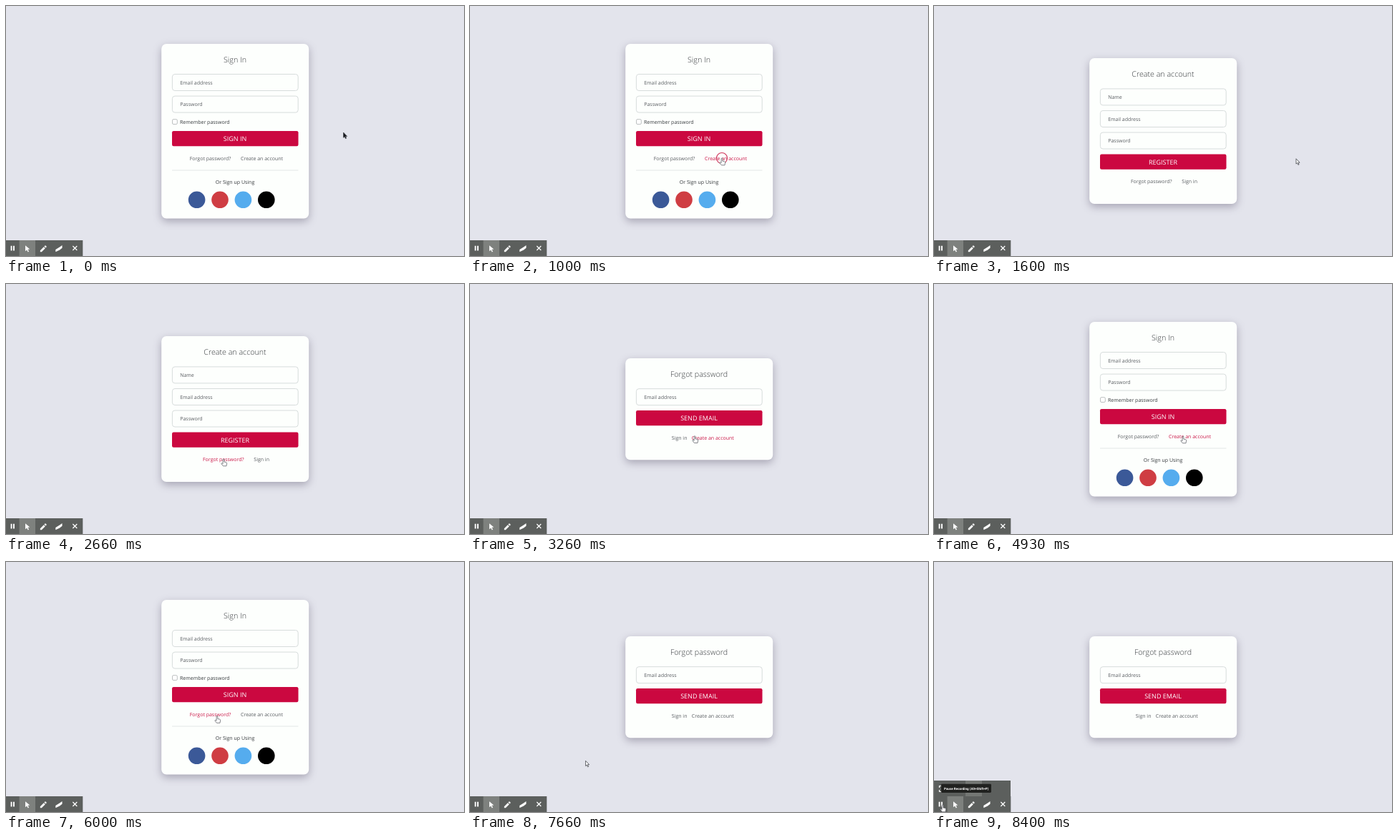
Recreate the animation shown at these times as an HTML page. Size 640 px wide and 350 px high, loop 8.46 s.

```html
<!DOCTYPE html>
<html lang="en">
<head>
<meta charset="utf-8">
<title>Sign in card</title>
<style>
  html, body { margin: 0; width: 100%; height: 100%; overflow: hidden; background: #e3e4ec; }
  svg { display: block; width: 640px; height: 350px; }
  text { font-family: "Open Sans", "Noto Sans", sans-serif; font-size: 7px; fill: #5a5d62; text-rendering: geometricPrecision; }
  .card { fill: #fdfffd; filter: drop-shadow(0 4px 6px rgba(50, 40, 70, .34)); }
  .title { font-size: 10.7px; font-weight: 300; fill: #33363a; text-anchor: middle; }
  .field { fill: #fdfffd; stroke: #d3d8d8; stroke-width: .9; }
  .button { fill: #cb0840; }
  .caption { font-size: 9px; fill: #fff; text-anchor: middle; }
  .dark { fill: #36393d; }
  .hot { fill: #cb1748; }
  .rule { stroke: #e3e6e6; }
  .tip text { font-family: Roboto, sans-serif; font-size: 4.55px; font-weight: 700; fill: #fff; }
  .ring { fill: none; stroke: #cf3359; stroke-width: 1.1; }
</style>
</head>
<body>
<svg viewBox="0 0 640 350" xmlns="http://www.w3.org/2000/svg">
  <rect width="640" height="350" fill="#e3e4ec"/>
  <g id="views"></g>
  <g id="drawer">
    <rect y="306" width="107" height="23" fill="#5c5f5d"/>
    <rect x="44" y="306" width="23" height="22" fill="#747774"/>
    <path d="M10 313.5H7.5V316M7.5 319V321.5H10" fill="none" stroke="#fff" stroke-width="1.2"/>
  </g>
  <g id="bar" fill="#fff">
    <rect y="328" width="107.3" height="22" fill="#5c5f5d"/>
    <rect x="18.6" y="328" width="22.4" height="22" fill="#7e817e"/>
    <path d="M6.6 335.7h1.9v6.8h-1.9zM10 335.7h1.9v6.8h-1.9z"/>
    <path d="M27 335.2l6.3 5.2-2.8.4 1.5 3-1.3.6-1.5-3-2.2 1.9z"/>
    <path d="M47.8 344.2v-2l5-5 2 2-5 5zM53.4 336.6l1.1-1.1q.5-.4 1 0l1 1q.4.5 0 1l-1.1 1.1z"/>
    <path d="M69.3 341.1l5.6-3.5 3.6-2.6v3.8l-3.4 2.8-5.8 2.7z"/>
    <path d="M93.3 336l6 6M99.3 336l-6 6" stroke="#fff" stroke-width="1.25"/>
  </g>
  <g id="tip" class="tip">
    <rect x="10" y="310.8" width="70" height="12.2" rx="1.4" fill="#20211f"/>
    <text x="14" y="318.6">Pause Recording (Alt+Shift+P)</text>
  </g>
  <circle id="ring" class="ring" r="7.5"/>
  <path id="arrow" d="M0 0V7.3L1.7 5.8 2.9 8.6 4.1 8.1 2.9 5.4H5.1Z" stroke="#45474d" stroke-width=".8" stroke-linejoin="round"/>
  <path id="hand" d="M-.9.6Q0-.6.9.6V4.1L3.7 4.7Q4.8 5 4.6 6.2L4 9.8H-.6L-3.1 6.6Q-2.9 5.3-1.7 6L-.9 6.7Z" fill="#fff" stroke="#64666c" stroke-width=".8" stroke-linejoin="round"/>
</svg>
<script>
const LOOP = 8460, STEP = 1000 / 15;
const $ = id => document.getElementById(id);

function add(parent, tag, attrs, text) {
  const el = document.createElementNS("http://www.w3.org/2000/svg", tag);
  for (const k in attrs) el.setAttribute(k, attrs[k]);
  if (text) el.textContent = text;
  parent.append(el);
  return el;
}

// Every view: card top and height, title, fields with their centres, button, links
const specs = {
  signin: {
    top: 53, height: 244.5, title: "Sign In",
    fields: [["Email address", 107], ["Password", 137.6]],
    button: ["SIGN IN", 185.7], linkY: 213,
    links: [["Forgot password?", 256.7, 58], ["Create an account", 328, 59]]
  },
  register: {
    top: 73, height: 204, title: "Create an account",
    fields: [["Name", 127.4], ["Email address", 158], ["Password", 188.5]],
    button: ["REGISTER", 218.2], linkY: 245.5,
    links: [["Forgot password?", 275, 58], ["Sign in", 346.3, 22.5]]
  },
  forgot: {
    top: 104, height: 142.3, title: "Forgot password",
    fields: [["Email address", 158.2]],
    button: ["SEND EMAIL", 187.7], linkY: 215,
    links: [["Sign in", 281.8, 22.5], ["Create an account", 309.8, 59]]
  }
};

function build(s) {
  const g = add($("views"), "g");
  add(g, "rect", { class: "card", x: 217.2, y: s.top, width: 206, height: s.height, rx: 7 });
  add(g, "text", { class: "title", x: 320, y: s.top + 26 }, s.title);
  for (const [label, y] of s.fields) {
    add(g, "rect", { class: "field", x: 232.4, y: y - 11.5, width: 175.8, height: 23, rx: 3.6 });
    add(g, "text", { x: 243.2, y: y + 2.5 }, label);
  }
  const [caption, by] = s.button;
  add(g, "rect", { class: "button", x: 232, y: by - 10.6, width: 176.5, height: 21.2, rx: 2.2 });
  add(g, "text", { class: "caption", x: 320, y: by + 3.6 }, caption);
  s.anchors = s.links.map(([label, x]) => add(g, "text", { x, y: s.linkY + 2.5 }, label));
  s.group = g;
}
Object.values(specs).forEach(build);

const home = specs.signin.group;
add(home, "rect", { x: 232.5, y: 158.7, width: 6.8, height: 6.8, rx: 1.5, fill: "#fff", stroke: "#abb0b2", "stroke-width": .8 });
add(home, "text", { class: "dark", x: 243, y: 164.6 }, "Remember password");
add(home, "path", { class: "rule", d: "M232 230H408.5" });
add(home, "text", { class: "dark", x: 320, y: 249.4, "text-anchor": "middle" }, "Or Sign up Using");
["#3b5998", "#cf3d43", "#55acee", "#000"].forEach((fill, i) =>
  add(home, "circle", { cx: 266.6 + i * 32.4, cy: 271.3, r: 11.8, fill }));

// Start time of every view
const scenes = [[0, "signin"], [1060, "register"], [2790, "forgot"], [3990, "signin"], [6720, "forgot"]];
const clicks = [990, 2790, 3990, 6655];

// Pointer tip: time, x, y
const path = [
  [0, 471.5, 177], [200, 480, 182], [500, 420, 206], [800, 352, 213], [1130, 352, 213],
  [1580, 506, 213.8], [1930, 506, 213.8], [2300, 400, 238], [2640, 304, 245], [2800, 304, 245],
  [3040, 309, 225], [3260, 314, 212.7], [3600, 316, 213], [3860, 293, 214.5], [4130, 293, 214.5],
  [4700, 348, 213], [5260, 348, 213], [5800, 295, 215.5], [7420, 295, 215.5],
  [7666, 161.7, 278.2], [8000, 40, 330], [8240, 12, 340], [8460, 12, 340]
];

function tipAt(t) {
  let i = path.findIndex(p => p[0] > t);
  if (i < 0) return path[path.length - 1].slice(1);
  const [t0, x0, y0] = path[i - 1], [t1, x1, y1] = path[i];
  const u = (t - t0) / (t1 - t0), k = u * u * (3 - 2 * u) * .4 + u * .6;
  return [x0 + (x1 - x0) * k, y0 + (y1 - y0) * k];
}

const show = (el, on) => { el.style.display = on ? "" : "none"; };

function draw(ms) {
  const t = Math.floor((ms % LOOP + 7) / STEP) * STEP;
  const name = scenes.filter(s => s[0] <= t).pop()[1];
  const view = specs[name];
  const [x, y] = tipAt(t);

  for (const k in specs) show(specs[k].group, k === name);
  let over = Math.abs(y - view.button[1]) < 10.6 && x > 232 && x < 408;
  view.links.forEach(([, lx, w], i) => {
    const hot = x >= lx && x <= lx + w && Math.abs(y - view.linkY) < 6;
    view.anchors[i].setAttribute("class", hot ? "hot" : "");
    over = over || hot;
  });

  const onBar = x < 107 && y > 324;
  over = over || onBar;
  show($("drawer"), onBar);
  show($("tip"), t > 8320);
  $("tip").setAttribute("opacity", t > 8390 ? 1 : .6);

  show($("hand"), over);
  show($("arrow"), !over);
  $("arrow").setAttribute("fill", t < 500 ? "#15161a" : "#fff");
  for (const id of ["hand", "arrow", "ring"])
    $(id).setAttribute("transform", `translate(${x.toFixed(2)} ${y.toFixed(2)})`);
  show($("ring"), clicks.some(c => t >= c && t < c + 190));
}

const start = performance.now();
function tick() {
  draw(performance.now() - start);
  requestAnimationFrame(tick);
}
tick();
</script>
</body>
</html>
```
